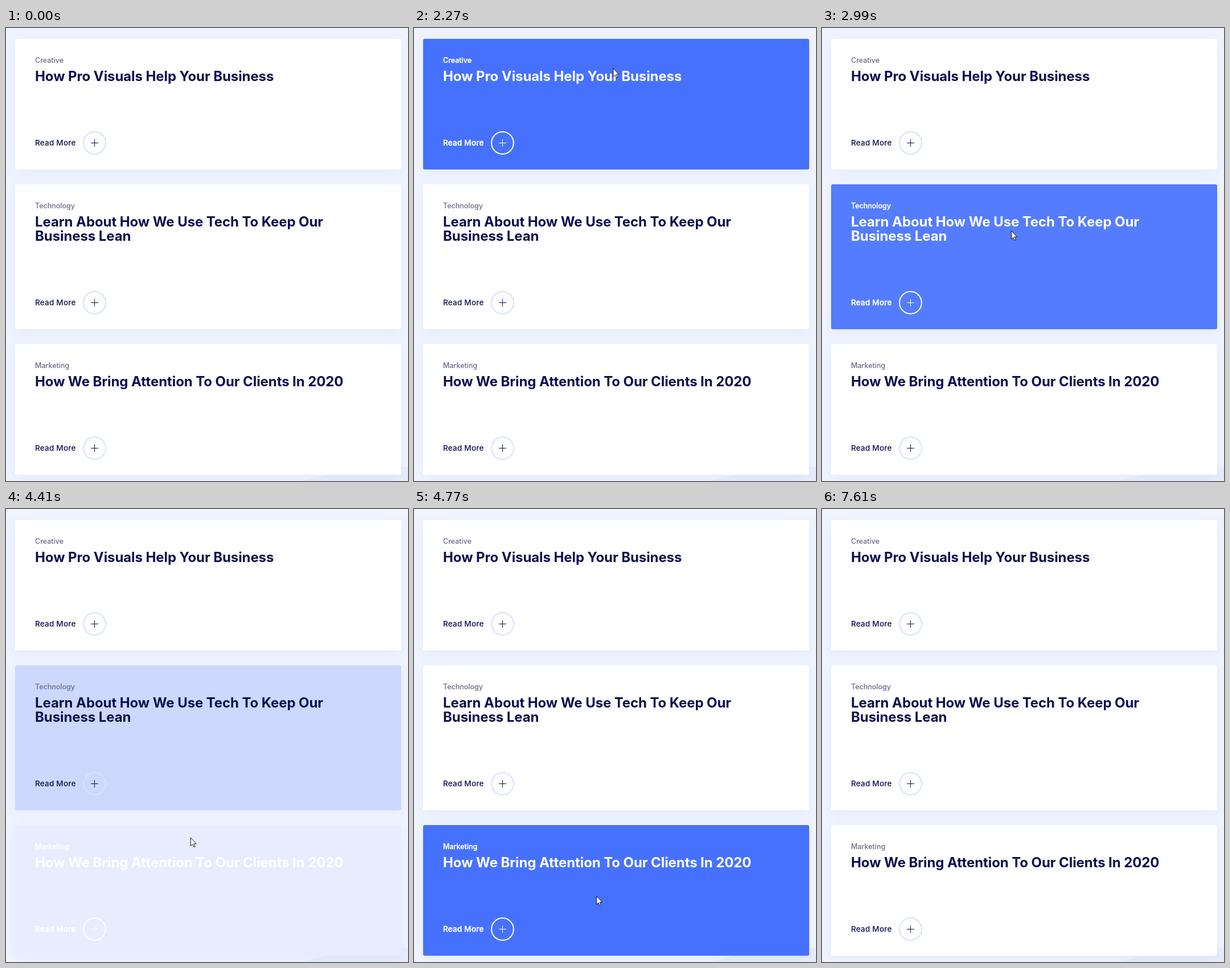
Animation of 706x794 px, one loop 8240 ms. Source, as an HTML page:

```html
<!DOCTYPE html>
<html lang="en">
<head>
<meta charset="utf-8">
<title>Article cards</title>
<style>
  html, body { margin: 0; width: 100%; height: 100%; overflow: hidden; }
  body {
    position: relative;
    background: #f0f4ff;
    font-family: Inter, "Open Sans", sans-serif;
  }

  .hill { position: absolute; left: 0; top: 0; }

  .card {
    --label: #6b6b86;
    --ink: #0a0f4f;
    --ring: #d7e3fb;
    --bold: 0;
    position: absolute;
    left: 16px;
    width: 678px;
    height: 228.4px;
    border-radius: 3px;
    background: #fff;
    box-shadow: 0 5px 22px rgba(70, 110, 235, .075);
    animation: enter .3s ease var(--in) forwards paused,
               leave .3s ease var(--out) forwards paused;
  }
  .card > * { position: absolute; left: 35px; margin: 0; white-space: nowrap; }

  .label {
    top: 28.6px;
    font-size: 12.5px;
    font-weight: 500;
    line-height: 18px;
    color: var(--label);
    -webkit-text-stroke: calc(var(--bold) * .35px) var(--label);
  }
  h2 {
    top: 52.6px;
    font-size: 24px;
    font-weight: 700;
    line-height: 25px;
    letter-spacing: -.09px;
    color: var(--ink);
  }
  .more {
    bottom: 37.3px;
    font-size: 13.5px;
    font-weight: 500;
    line-height: 18px;
    letter-spacing: .22px;
    color: var(--ink);
    -webkit-text-stroke: calc(var(--bold) * .45px) var(--ink);
  }
  .card > svg { left: 119px; bottom: 25.8px; fill: none; }
  .ring { stroke: var(--ring); stroke-width: 2; }
  .plus { stroke: var(--ink); stroke-width: 1; }

  /* Ink flips at once, only the background fades. */
  @keyframes enter {
    from, to { --label: #fff; --ink: #fff; --ring: #fff; --bold: 1; }
    from { background: #fff; }
    to { background: #4671ff; }
  }
  @keyframes leave {
    from, to { --label: #6b6b86; --ink: #0a0f4f; --ring: #d7e3fb; --bold: 0; }
    from { background: #4671ff; }
    to { background: #fff; }
  }

  #cursor { position: absolute; left: 0; top: 0; overflow: visible; }
</style>
</head>
<body>
  <svg class="hill" width="706" height="794">
    <path d="M515 795Q600 770 706 769V795Z" fill="#e8edfc"/>
  </svg>

  <svg width="0" height="0" style="position:absolute">
    <symbol id="button" viewBox="0 0 41 41">
      <circle class="ring" cx="20.5" cy="20.5" r="19.4"/>
      <path class="plus" d="M14 20.5h13M20.5 14v13"/>
    </symbol>
  </svg>

  <article class="card" style="top:19.4px; --in:1082ms; --out:2660ms">
    <p class="label">Creative</p>
    <h2>How Pro Visuals Help Your Business</h2>
    <span class="more">Read More</span>
    <svg width="41" height="41"><use href="#button"/></svg>
  </article>

  <article class="card" style="top:274.4px; height:253.4px; --in:2790ms; --out:4280ms">
    <p class="label">Technology</p>
    <h2>Learn About How We Use Tech To Keep Our<br>Business Lean</h2>
    <span class="more">Read More</span>
    <svg width="41" height="41"><use href="#button"/></svg>
  </article>

  <article class="card" style="top:554.4px; --in:4374ms; --out:6182ms">
    <p class="label">Marketing</p>
    <h2>How We Bring Attention To Our Clients In 2020</h2>
    <span class="more">Read More</span>
    <svg width="41" height="41"><use href="#button"/></svg>
  </article>

  <svg id="cursor" width="12" height="18">
    <path d="M.5 .5V15L3.8 12 6.2 17.2 8.4 16.2 6.1 11.1H10.4Z" fill="#fff" stroke="#111" stroke-linejoin="round"/>
  </svg>

<script>
  const LOOP = 8240;
  const STEP = 120;

  // The pointer glides from stop to stop and rests in between.
  const glides = [
    { start: 630, duration: 860, to: [350, 58], easing: 'ease-in-out' },
    { start: 2150, duration: 840, to: [332, 355], easing: 'ease-in-out' },
    { start: 4170, duration: 600, to: [320, 678], easing: 'ease' },
    { start: 6060, duration: 240, to: [304, 904], easing: 'ease-in' }
  ];

  const cursor = document.getElementById('cursor');
  const at = ([x, y]) => ({ transform: `translate(${x}px, ${y}px)` });

  let from = [353, -19];
  for (const { start, duration, to, easing } of glides) {
    const fill = start === glides[0].start ? 'both' : 'forwards';
    cursor.animate([at(from), at(to)], { delay: start, duration, easing, fill }).pause();
    from = to;
  }

  const animations = document.getAnimations();

  // Time advances in steps counted from the start of the latest glide.
  function stepped(t) {
    const { start } = glides.findLast(g => g.start <= t) ?? { start: 0 };
    return t - (t - start) % STEP;
  }

  const begin = performance.now();
  function draw() {
    const t = stepped((performance.now() - begin) % LOOP);
    for (const a of animations) a.currentTime = t;
    requestAnimationFrame(draw);
  }
  draw();
</script>
</body>
</html>
```
